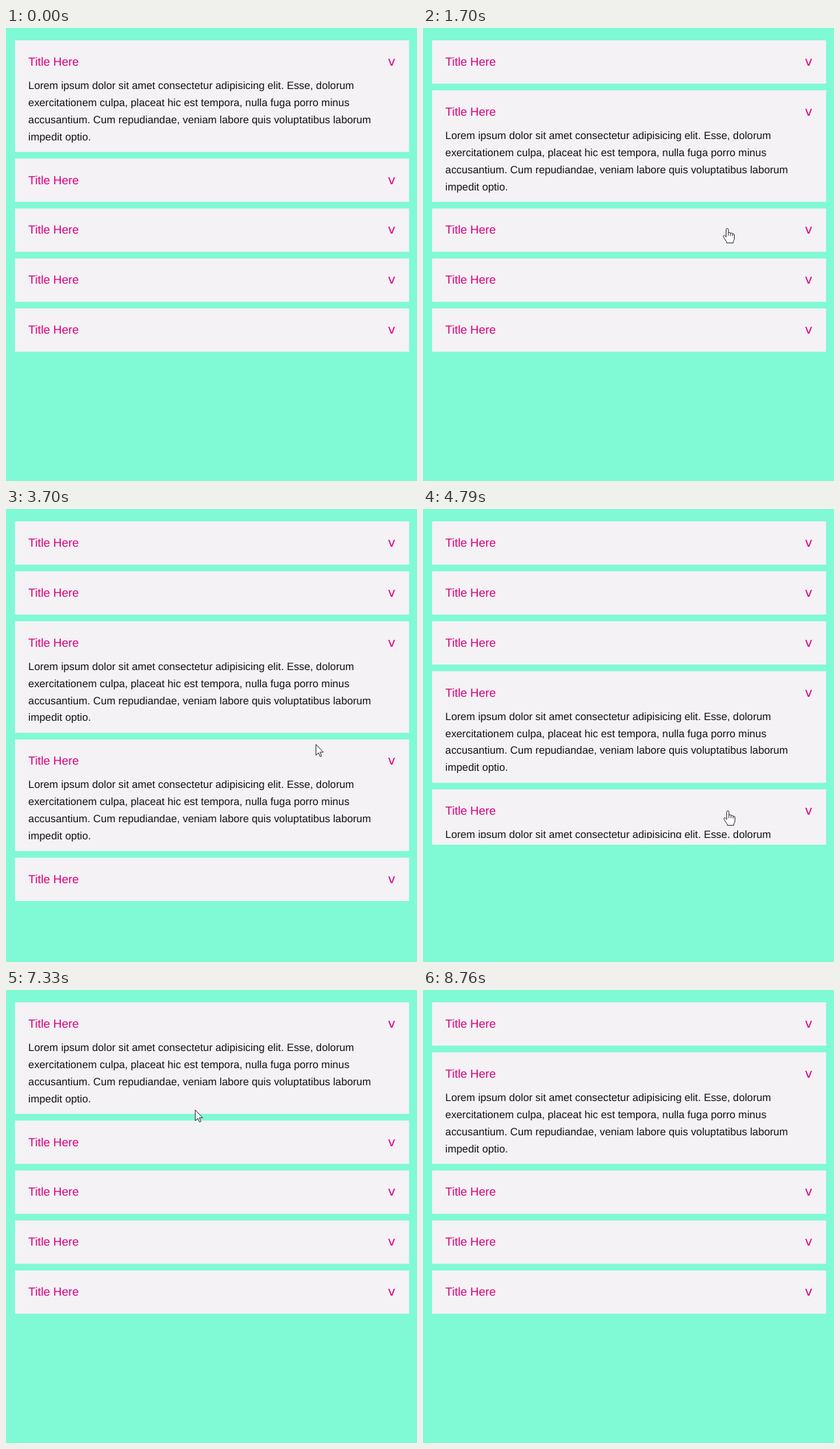
An HTML page with a canvas for the animation above (9.58 s loop, 600 by 661 pixels).

```html
<!DOCTYPE html>
<html lang="en">
<head>
<meta charset="utf-8">
<title>Accordion</title>
<style>
html, body { margin: 0; width: 100%; height: 100%; overflow: hidden; background: #80f9d5; }
canvas { display: block; }
</style>
</head>
<body>
<canvas id="stage" width="600" height="661"></canvas>
<script>
const ctx = document.getElementById('stage').getContext('2d');
const LOOP = 9580;
const COUNT = 5;
const FADE = 500;            // max-height transition
const MAX = 970;             // open max-height
const LINE = 24.9, BODY = 4 * LINE;
const HEAD = 53.5, FOOT = 9.7, GAP = 9.7;
const LEFT = 13.2, RIGHT = 588.5, TOP = 18, INDENT = LEFT + 19.4;
const FONT = '"Liberation Sans", Arial, sans-serif';
const PINK = '#d9007e';
const LINES = [
  'Lorem ipsum dolor sit amet consectetur adipisicing elit. Esse, dolorum',
  'exercitationem culpa, placeat hic est tempora, nulla fuga porro minus',
  'accusantium. Cum repudiandae, veniam labore quis voluptatibus laborum',
  'impedit optio.'
];

// Each click opens the next item; the first one is open from the start
const CLICKS = [-FADE, 865, 2217, 3615, 4775, 6080, 7715];

// Pointer visits: entry point, then moves as [begin, end, x, y] with rests between
const VISITS = [
  { from: [602, 300], moves: [
    [380, 700, 483, 221], [1400, 1790, 442, 296], [2850, 3120, 446, 362], [3620, 3700, 452, 343],
    [4150, 4580, 445, 440], [5640, 6050, 441, 61], [6760, 6890, 453, 24]] },
  { from: [306, 27], moves: [[7110, 7580, 264, 232], [8215, 8450, 400, 530]] }
];

const mix = (a, b, k) => a + (b - a) * k;
const clamp = k => Math.max(0, Math.min(1, k));

// CSS "ease": cubic-bezier(.25, .1, .25, 1)
function ease(x) {
  if (x <= 0 || x >= 1) return clamp(x);
  let lo = 0, hi = 1;
  for (let i = 0; i < 24; i++) {
    const s = (lo + hi) / 2;
    if (0.75 * s * (1 - s) + s ** 3 < x) lo = s; else hi = s;
  }
  const r = 1 - lo;
  return 0.3 * lo * r * r + 3 * lo * lo * r + lo ** 3;
}

function layout(t) {
  const n = CLICKS.filter(c => c <= t).length - 1;
  const k = ease((t - CLICKS[n]) / FADE);
  const items = [];
  for (let i = 0, y = TOP; i < COUNT; i++) {
    const share = i === n % COUNT ? k : n > 0 && i === (n - 1) % COUNT ? 1 - k : 0;
    const body = Math.min(BODY, MAX * share);
    const h = HEAD + body + FOOT;
    items.push({ y, body, h });
    y += h + GAP;
  }
  return items;
}

function text(str, x, y, size, color, family = FONT) {
  ctx.font = `${size}px ${family}`;
  ctx.fillStyle = color;
  ctx.fillText(str, x, y);
}

function drawItem({ y, body, h }) {
  ctx.fillStyle = '#f4f2f5';
  ctx.fillRect(LEFT, y, RIGHT - LEFT, h);
  text('Title Here', INDENT, y + 37, 17.15, PINK);
  text('v', 557.5, y + 37, 18.4, PINK, '"DejaVu Sans", Verdana, sans-serif');
  if (!body) return;
  ctx.save();
  ctx.beginPath();
  ctx.rect(LEFT, y + HEAD, RIGHT - LEFT, body);
  ctx.clip();
  LINES.forEach((line, i) => text(line, INDENT, y + 70.9 + i * LINE, 15.36, '#111'));
  ctx.restore();
}

function pointerAt(t) {
  const visit = VISITS.find(({ moves }) => t >= moves[0][0] && t < moves[moves.length - 1][1]);
  if (!visit) return null;
  let [x, y] = visit.from;
  for (const [begin, end, toX, toY] of visit.moves) {
    const k = clamp((t - begin) / (end - begin)), s = k * (2 - k);
    x = mix(x, toX, s);
    y = mix(y, toY, s);
  }
  return { x, y };
}

function pointerKind(x, y, items) {
  if (x < INDENT || x > 569) return 'arrow';
  for (const it of items) {
    const d = y - it.y;
    if (d >= 10 && d < HEAD) return 'hand';
    if (d >= HEAD && d < HEAD + it.body) return 'beam';
  }
  return 'arrow';
}

const ARROW = new Path2D('M.5 .5V16.2L4.2 12.8L6.7 18.3L8.8 17.4L6.4 11.9H11.2Z');
const HAND = new Path2D(
  'M-1.6 13V1.6Q-1.6 .5 0 .5T1.6 1.6V6.6Q4 5 4.7 7.3Q7 6 7.8 8.3Q10.4 7.6 10.4 10V15' +
  'Q10.3 17.5 8.7 19.3V21.6H-.8V19.8Q-2.4 18.3-3.6 15.7L-5.7 12.5Q-6.2 11 -5 10.6T-2.8 11.6Z' +
  'M1.6 6.6V11M4.7 7.3V11.2M7.8 8.3V11.6');
const BEAM = new Path2D('M-3.5-6.5H-1L0-5.5L1-6.5H3.5M0-5.5V5.5M-3.5 6.5H-1L0 5.5L1 6.5H3.5');

function drawPointer({ x, y }, items) {
  const kind = pointerKind(x, y, items);
  const shape = { arrow: ARROW, hand: HAND, beam: BEAM }[kind];
  ctx.save();
  ctx.translate(x, y);
  ctx.lineJoin = 'round';
  ctx.strokeStyle = '#2a2a32';
  ctx.fillStyle = '#fff';
  if (kind !== 'beam') ctx.fill(shape);
  ctx.stroke(shape);
  ctx.restore();
}

function draw(t) {
  ctx.fillStyle = '#80f9d5';
  ctx.fillRect(0, 0, 600, 661);
  const items = layout(t);
  items.forEach(drawItem);
  const pointer = pointerAt(t);
  if (pointer) drawPointer(pointer, items);
}

ctx.textRendering = 'geometricPrecision';
const start = performance.now();
function tick() {
  draw((performance.now() - start) % LOOP);
  requestAnimationFrame(tick);
}
tick();
</script>
</body>
</html>
```
